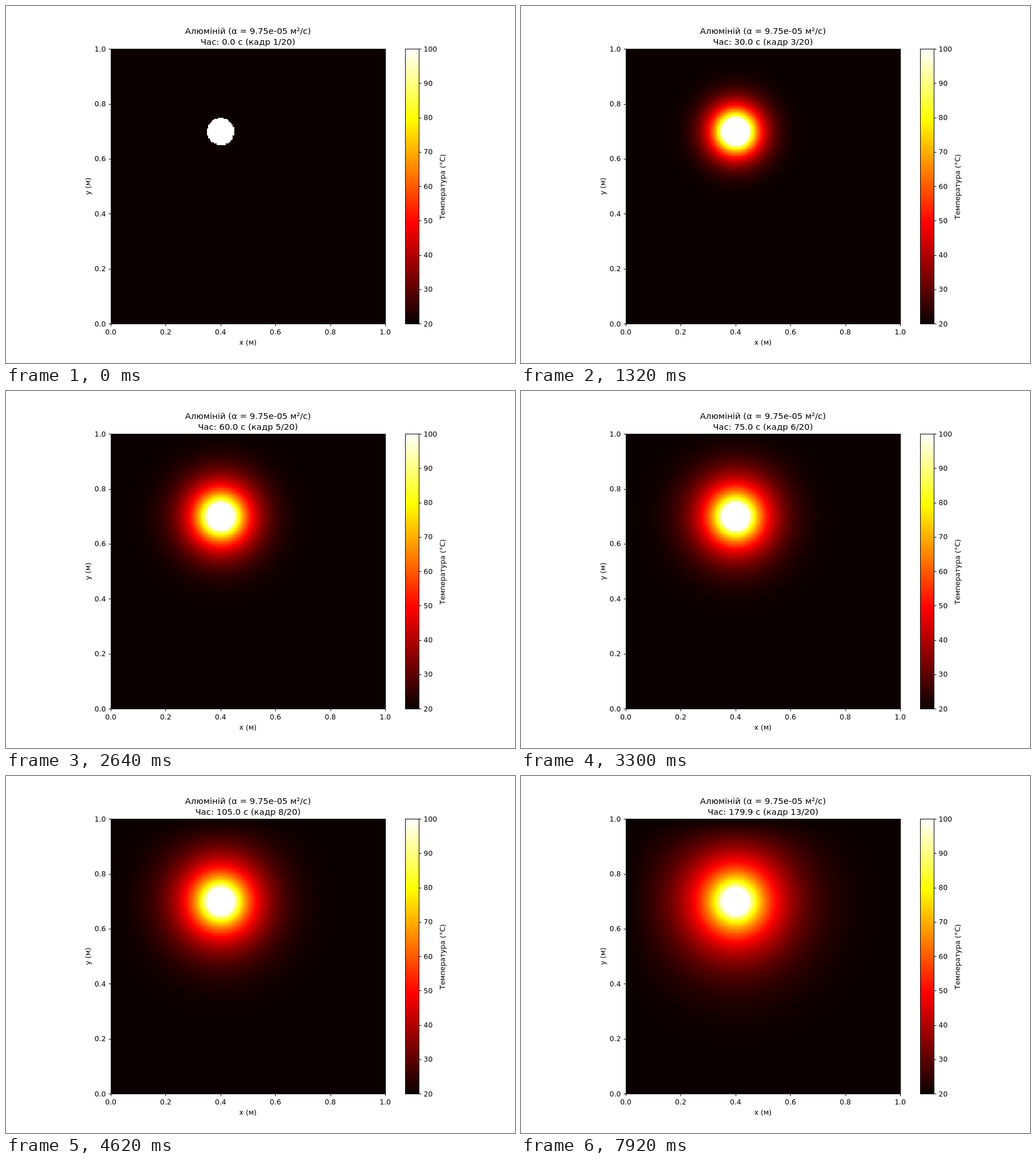
Animation of 894x626 px, one loop 8 s. Source, as an HTML page with a canvas:

```html
<!DOCTYPE html>
<html lang="uk">
<head>
<meta charset="utf-8">
<title>Теплопровідність</title>
<style>
html, body { margin: 0; width: 100%; height: 100%; overflow: hidden; background: #fff; }
canvas { display: block; }
</style>
</head>
<body>
<canvas id="stage" width="894" height="626"></canvas>
<script>
const ctx = document.getElementById('stage').getContext('2d');
const LOOP = 8000, HOLD = 660;
const LEFT = 184, TOP = 75, SIZE = 482, BAR = 701, BAR_W = 24;

// Heat equation on an N x N grid: cold edges, a disc held at 100 °C
const N = 200, ALPHA = 9.75e-5, STEP = 14.9935, SUBSTEPS = 240;
const RATE = ALPHA * STEP / SUBSTEPS * (N - 1) ** 2;
let heat = new Float64Array(N * N).fill(20);
const disc = [];
for (let j = 0; j < N; j++)
  for (let i = 0; i < N; i++)
    if (Math.hypot(i / (N - 1) - 0.4, j / (N - 1) - 0.7) <= 0.05) disc.push(j * N + i);
for (const c of disc) heat[c] = 100;
let next = heat.slice();

function diffuse() {
  for (let j = 1; j < N - 1; j++) {
    for (let c = j * N + 1; c < j * N + N - 1; c++) {
      next[c] = heat[c] + RATE * (heat[c - 1] + heat[c + 1] + heat[c - N] + heat[c + N] - 4 * heat[c]);
    }
  }
  for (const c of disc) next[c] = 100;
  [heat, next] = [next, heat];
}

// "hot" colour map with 256 levels
const clamp = v => Math.max(0, Math.min(1, v));
const hot = Array.from({ length: 256 }, (_, k) => {
  const v = k / 255;
  return [
    0.0416 + 0.9584 * v / 0.365079,
    (v - 0.365079) / 0.380953,
    (v - 0.746032) / 0.253968
  ].map(x => Math.round(255 * clamp(x)));
});

function paintField() {
  const map = document.createElement('canvas');
  map.width = map.height = N;
  const g = map.getContext('2d');
  const img = g.createImageData(N, N);
  for (let j = 0; j < N; j++) {
    for (let i = 0; i < N; i++) {
      const level = Math.min(255, Math.floor((heat[j * N + i] - 20) / 80 * 256));
      img.data.set([...hot[level], 255], ((N - 1 - j) * N + i) * 4);
    }
  }
  g.putImageData(img, 0, 0);
  return map;
}

const fields = [paintField()];
function field(n) {
  while (fields.length <= n) {
    for (let s = 0; s < SUBSTEPS; s++) diffuse();
    fields.push(paintField());
  }
  return fields[n];
}

function text(str, x, y, align = 'center', size = 12.417) {
  ctx.font = size + 'px "DejaVu Sans", sans-serif';
  ctx.textAlign = align;
  ctx.fillText(str, x, y);
}

function upright(str, x, y) {
  ctx.save();
  ctx.translate(x, y);
  ctx.rotate(-Math.PI / 2);
  text(str, 0, 0);
  ctx.restore();
}

function drawAxes() {
  ctx.fillStyle = ctx.strokeStyle = '#000';
  ctx.lineWidth = 1;
  ctx.strokeRect(LEFT + 0.5, TOP + 0.5, SIZE, SIZE);
  ctx.strokeRect(BAR + 0.5, TOP + 0.5, BAR_W, SIZE);
  for (let k = 0; k <= 5; k++) {
    const x = 184.01 + k * 96.404, y = 557.14 - k * 96.404;
    const label = (k / 5).toFixed(1);
    ctx.fillRect(Math.round(x), 557.5, 1, 4);
    ctx.fillRect(180.5, Math.round(y), 4, 1);
    text(label, x, 576);
    text(label, 175.3, Math.floor(y + 4.9), 'right');
  }
  for (let k = 0; k <= 8; k++) {
    const y = 557.14 - k * 60.2525;
    ctx.fillRect(725.5, Math.round(y), 4, 1);
    text(20 + 10 * k, 733.5, Math.floor(y + 4.9), 'left');
  }
  text('x (м)', 425, 594);
  upright('y (м)', 148, 316);
  upright('Температура (°C)', 771, 317);
}

function drawBar() {
  for (let y = 0; y < SIZE; y++) {
    ctx.fillStyle = `rgb(${hot[Math.floor((SIZE - y - 0.5) / SIZE * 256)]})`;
    ctx.fillRect(BAR, TOP + y, BAR_W, 1);
  }
}

function draw(n) {
  ctx.fillStyle = '#fff';
  ctx.fillRect(0, 0, 894, 626);
  ctx.imageSmoothingEnabled = false;
  ctx.drawImage(field(n), LEFT, TOP, SIZE, SIZE);
  drawBar();
  drawAxes();
  text('Алюміній (α = 9.75e-05 м²/с)', 425, 49, 'center', 14.9);
  text(`Час: ${(n * STEP).toFixed(1)} с (кадр ${n + 1}/20)`, 425, 68, 'center', 14.9);
}

let shown = -1;
function tick() {
  const n = Math.floor(performance.now() % LOOP / HOLD);
  if (n !== shown) draw(shown = n);
  requestAnimationFrame(tick);
}
tick();
</script>
</body>
</html>
```
